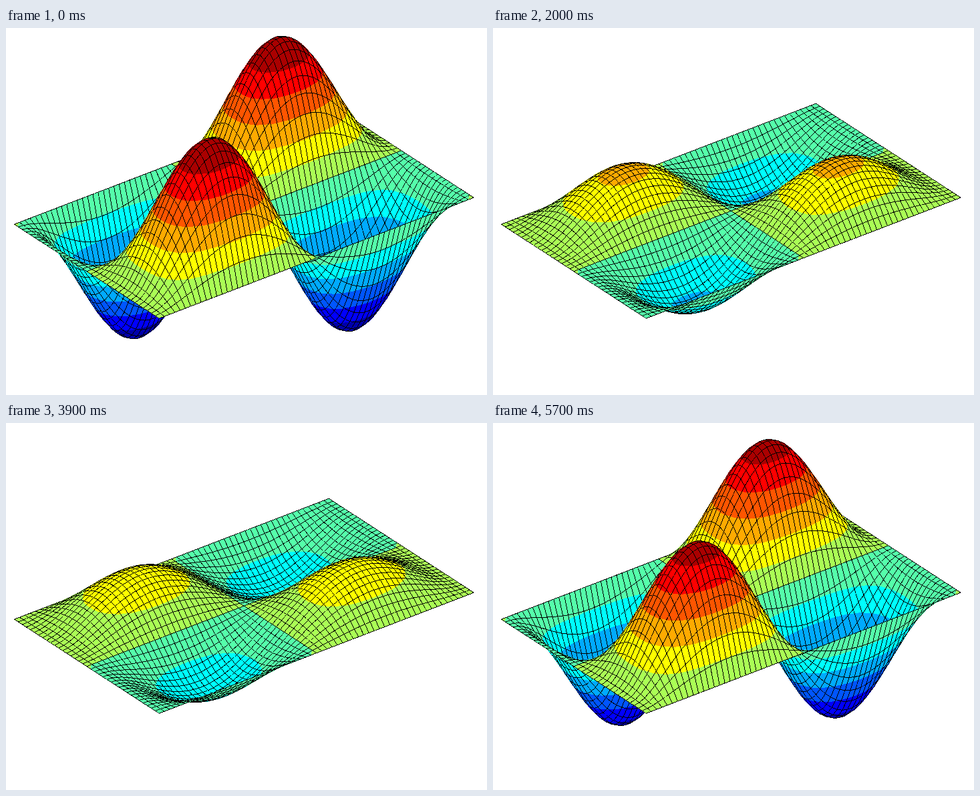
Animation of 720x550 px, one loop 5.8 s. Source, as a matplotlib script:

```python
from functools import lru_cache

import numpy as np
import matplotlib.pyplot as plt
from matplotlib.animation import FuncAnimation
from matplotlib.collections import PolyCollection

W, H, DPI = 720, 550, 100
FRAMES, STEP_MS = 58, 100
NU, NV = 60, 36
BANDS = 12
HAIR = 2 / 256   # thin enough that an aliased fill is one pixel wide
INSET = 0.35     # keeps fills from spilling over the grid lines

# Oblique view of the plate: left corner, long side, short side, height
ORIGIN = np.array([12.3, 294.2])
SIDE_U = np.array([471.0, -181.0])
SIDE_V = np.array([217.0, 141.0])
LIFT = 182.8


def clamped_mode(u, k=6.98, q=19.15):
    """Second bending mode between two clamped ends."""
    x = u - 0.5
    f = np.sin(k * x) - np.sin(k / 2) * np.sinh(q * x) / np.sinh(q / 2)
    f[[0, len(f) // 2, -1]] = 0
    return f / f.max()


def supported_mode(v):
    f = np.sin(2 * np.pi * v)
    f[[0, len(f) // 2, -1]] = 0
    return f


def jet(i):
    return tuple(np.clip((4.5 - abs(i - c)) / 3, 0, 1) for c in (8.5, 5.5, 2.5)) + (1.0,)


u, v = np.linspace(0, 1, NU + 1), np.linspace(0, 1, NV + 1)
shape = np.outer(clamped_mode(u), supported_mode(v))
base = ORIGIN + u[:, None, None] * SIDE_U + v[None, :, None] * SIDE_V

# Cells from back to front
cells = sorted(((i, j) for i in range(NU) for j in range(NV)),
               key=lambda c: base[c[0], c[1], 1])
colors = [jet(i) for i in range(BANDS)]
BLACK = (0, 0, 0, 1)


def corners(a):
    """The four corner values of every cell, in ring order."""
    return np.stack([a[:-1, :-1], a[1:, :-1], a[1:, 1:], a[:-1, 1:]], axis=2)


def hairlines(quads, k):
    """The two cell edges that meet in corner k, as one thin polygon."""
    p, ring = quads[:, :, k], []
    for n in (k - 1, (k + 1) % 4):
        q = quads[:, :, n]
        dx, dy = np.moveaxis(q - p, -1, 0)
        steep = abs(dy) > abs(dx)
        off = HAIR * np.stack([-np.sign(dy) * steep, np.sign(dx) * ~steep], -1)
        ring += [p, p + off, q + off, q]
    return np.stack(ring, axis=2)


def above(pts, vals, level):
    """Part of a polygon where the value reaches the level."""
    out = []
    for n in range(len(pts)):
        (x0, y0), (x1, y1) = pts[n - 1], pts[n]
        s0, s1 = vals[n - 1], vals[n]
        if (s0 >= level) != (s1 >= level):
            t = (level - s0) / (s1 - s0)
            out.append((x0 + t * (x1 - x0), y0 + t * (y1 - y0)))
        if s1 >= level:
            out.append((x1, y1))
    return out


@lru_cache(maxsize=None)
def surface(step):
    z = (1 - step * 4 / FRAMES) * shape
    xy = base.copy()
    xy[..., 1] -= LIFT * z
    quads = corners(xy)
    back, front = hairlines(quads, 1), hairlines(quads, 3)
    arm = quads - quads.mean(axis=2, keepdims=True)
    fills = (quads - np.clip(arm, -INSET, INSET)).tolist()
    level = corners((z + 1) * BANDS / 2 + 1e-9)
    band = np.clip(level.astype(int), 0, BANDS - 1).tolist()
    level = level.tolist()
    polys, faces = [], []

    def add(poly, color):
        polys.append(poly)
        faces.append(color)

    for i, j in cells:
        pts, vals, ids = fills[i][j], level[i][j], band[i][j]
        if min(ids) == max(ids):
            add(pts, colors[ids[0]])
        else:
            for tri in ((0, 1, 3), (1, 2, 3)):
                p, s = [pts[n] for n in tri], [vals[n] for n in tri]
                k = [ids[n] for n in tri]
                add(p, colors[min(k)])
                for b in range(min(k) + 1, max(k) + 1):
                    part = above(p, s, b)
                    if len(part) > 2:
                        add(part, colors[b])
        add(back[i, j], BLACK)
        if i == 0 or j == NV - 1:
            add(front[i, j], BLACK)
    return polys, faces


fig = plt.figure(figsize=(W / DPI, H / DPI), dpi=DPI, facecolor="white")
ax = fig.add_axes([0, 0, 1, 1])
ax.set(xlim=(0, W), ylim=(H, 0))
ax.axis("off")
mesh = PolyCollection([], antialiaseds=False, edgecolors="none", linewidths=0, snap=False)
ax.add_collection(mesh, autolim=False)


def draw(k):
    polys, faces = surface(min(k, FRAMES - k))
    mesh.set_verts(polys)
    mesh.set_facecolor(faces)
    return (mesh,)


anim = FuncAnimation(fig, draw, frames=FRAMES, interval=STEP_MS,
                     repeat=True, repeat_delay=0, blit=False)
plt.show()
```
